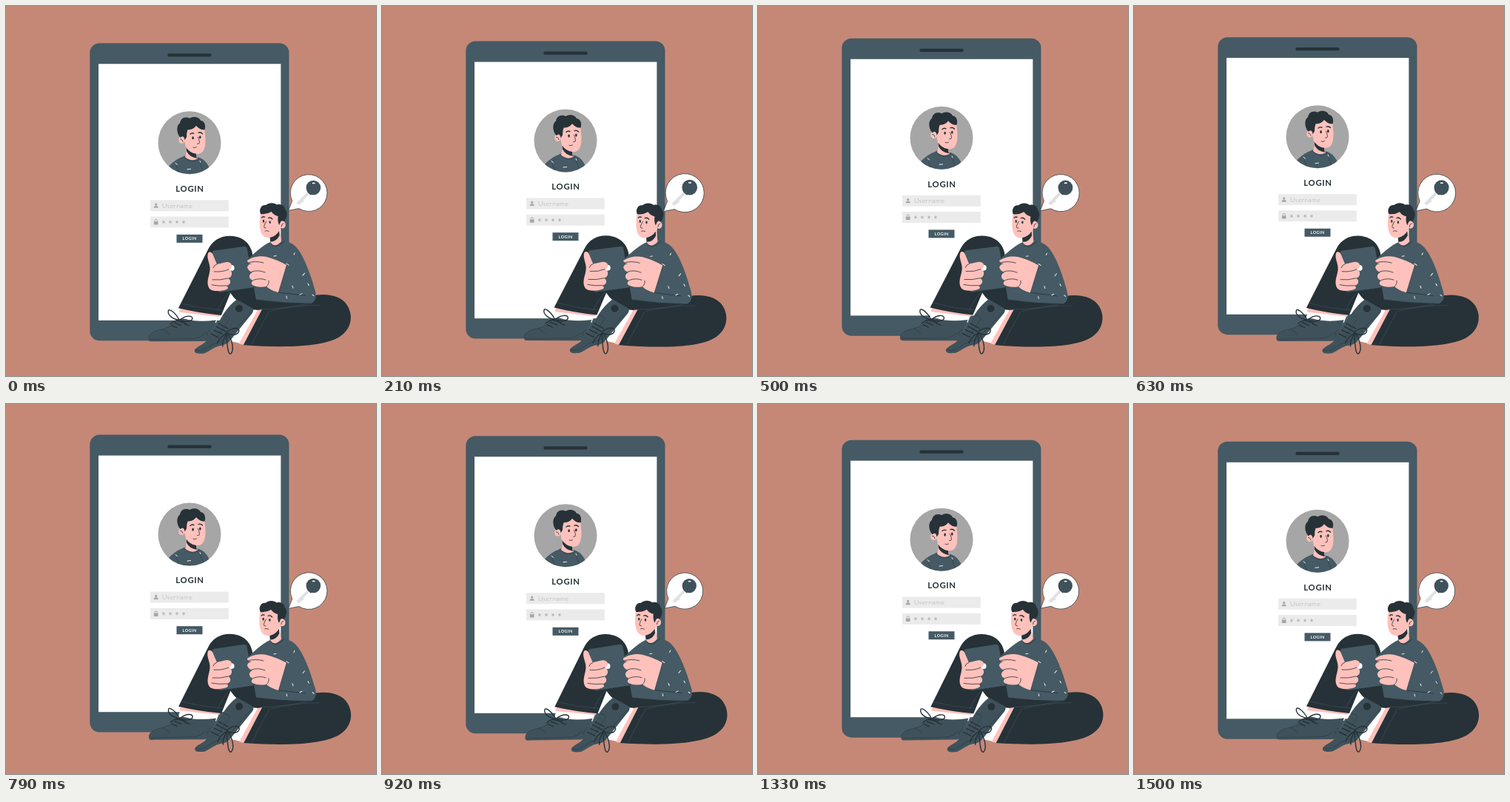
These frames come from a looping animation (500 by 500 pixels, 1540 ms). An HTML page:

```html
<!DOCTYPE html>
<html lang="en">
<head>
<meta charset="utf-8">
<title>Login</title>
<style>
html, body { margin: 0; width: 100%; height: 100%; overflow: hidden; background: #c58877; }
svg { display: block; width: 100%; height: 100%; }
text { font-family: Lato, "Open Sans", sans-serif; }
.dark { fill: #263238; }
.slate { fill: #455a64; }
.shade { fill: #3f525b; }
.skin { fill: #ffc1bb; }
.grey { fill: #a6a6a6; }
.pale { fill: #ebebeb; }
.white { fill: #fff; }
.line { fill: none; stroke: #263238; stroke-width: .8; stroke-linecap: round; stroke-linejoin: round; }
.bold { stroke-width: 1.4; }
.fine { stroke-width: .5; }
.edge { fill: none; stroke: #455a64; stroke-width: .5; }
.fleck { fill: none; stroke: #f2f2f2; stroke-width: 1; stroke-linecap: round; }
</style>
</head>
<body>
<svg viewBox="0 0 500 500">
  <defs><clipPath id="disc"><circle cx="248" cy="185.5" r="42.5"/></clipPath></defs>
  <rect width="500" height="500" fill="#c58877"/>

  <g id="panel">
    <rect class="slate" x="113.3" y="51" width="269.2" height="402" rx="13"/>
    <rect class="white" x="125" y="79" width="246.4" height="346.6"/>
    <rect class="dark" x="218.5" y="64.9" width="59" height="4.3" rx="1.6"/>

    <circle class="grey" cx="248" cy="185.5" r="42.5"/>
    <g clip-path="url(#disc)">
      <path class="slate" d="M213 226C221 214 231 207 242 203Q252 212 259 205C268 207 273 214 278 226L270 232H214Z"/>
      <path class="skin" d="M239 172L243 192Q244.5 199 242 205Q251 212 259 207Q257 204 257 200.5C266 202 270 194 269.5 180L268 164L247 160Z"/>
      <path class="dark" d="M243.5 192Q248 199 257 200.5Q257 204 258 206.5Q248 205 244 197Z"/>
      <ellipse class="skin" cx="237.5" cy="181.5" rx="4.2" ry="5"/>
      <path class="dark" d="M235.5 178.5C230 172 230 162 235 159C236 152 243 149.5 248 152.5C254 149 261 151 263 155.5C268 156 270.5 162 268.5 168C264 168.5 260 166 257 162.5C254 167 249 168 245.5 168Q244 172 244 178L241.5 182Q241 177 238 177Z"/>
      <ellipse class="dark" cx="252.6" cy="179" rx="1.3" ry="2.1"/>
      <ellipse class="dark" cx="262.3" cy="178" rx="1.3" ry="2.1"/>
      <path class="line" d="M259.5 178Q262.5 185 261 186.5L258.5 187M253 191.8Q255 192.8 257.5 191.4M235.5 180.5Q238 180 239 184"/>
      <path class="line bold" d="M249 173.8Q251.5 171.6 254 173M260 172Q263 170.6 265.5 173.4"/>
      <path class="line fine" d="M240 204Q251 216 261 207M262 212L268 228M230 217L235 228"/>
      <path class="fleck" d="M229 213L231.5 215M245 221.5L249.5 221M262 210L263 212M224 222L226 223"/>
    </g>

    <text x="229.3" y="251.8" font-size="11.3" font-weight="700" letter-spacing=".7" fill="#263238">LOGIN</text>
    <rect class="pale" x="195" y="263" width="105.8" height="15"/>
    <rect class="pale" x="195" y="285.2" width="105.8" height="15"/>
    <g class="grey">
      <circle cx="202.7" cy="268.8" r="1.6"/>
      <path d="M199.6 273.5Q199.8 270.7 202.7 270.7T205.8 273.5Z"/>
      <rect x="199.9" y="292" width="5.6" height="4.3" rx=".6"/>
      <path d="M201 292.3V291Q201 289.2 202.7 289.2T204.4 291V292.3" fill="none" stroke="#a6a6a6" stroke-width=".9"/>
    </g>
    <text x="211" y="273.6" font-size="8.6" font-weight="300" letter-spacing=".5" fill="#a6a6a6">Username</text>
    <path id="stars" fill="none" stroke="#a6a6a6" stroke-width=".7"/>
    <rect class="slate" x="230.5" y="309.6" width="35" height="11"/>
    <text x="238.6" y="317" font-size="5.4" font-weight="700" letter-spacing=".5" fill="#fff">LOGIN</text>
  </g>

  <g id="man">
    <!-- far foot -->
    <path class="white" d="M236 412L288 418L284 428L231 427Z"/>
    <path class="skin" d="M236 408L291 416L288 420L234 414Z"/>
    <path class="shade" d="M193 451C192 444 199 440 210 437.5Q224 434 231 425.5Q236 421 242 423Q258 428 284 424.5L274 450Q272 453 266 453L199 453.5Q193 454 193 451Z"/>
    <path class="line fine" d="M193 450Q196 451 203 450.7L256 449.5Q264 448 270 442M276 438Q271 441 272 446M193 448C195 442 201 439 210 437.5Q223 434 230 426.5M212 437.5Q217 440 221 444"/>
    <path class="line bold" d="M224 432L231 435M228 428.5L237 432M231 425.5L243 429M234 424C228 413 220 409 219.5 412C218 418 226 424 235 424.5C243 418 251 418 252 422C252 427 242 428 235 424.5M235 424.5Q227 425 222 430M236 424.5Q243 432 248 432"/>

    <!-- near leg -->
    <path class="dark" d="M302 386L338 378L412 392C432 387 453 391 461 404C470 418 467 436 452 446C434 459 385 463 319.5 458L344 411L333 412Q312 402 302 386Z"/>
    <path class="white" d="M331 410L341 411L317 456L300 452Z"/>
    <path class="skin" d="M340 411L346 410L321 458L315 456.5Z"/>
    <path class="edge" d="M356 412Q342 437 332 458M358 412Q390 404 424 404M344 410Q380 409 412 401"/>

    <!-- raised leg -->
    <path class="dark" d="M233 408.5L273.5 328C281 313 297 308 312 312C327 316 333 328 334 341L340 388L304 386L291 418Q260 415 233 408.5Z"/>
    <path class="edge" d="M237 402Q264 409 293 411M303 386Q293 395 286 412"/>

    <!-- near foot -->
    <path class="shade" d="M255 467C254 462 264 459 269 454.5Q283 436 294 416Q302 404 312 396.5L334 409Q335 411 333 415L304 451Q299 458 290 459C282 460 275 467 268 469.5Q256 471 255 467Z"/>
    <path class="line fine" d="M255.5 465Q264 468 271 463Q281 455 291 453Q300 449 304 443L333 412M294 418Q300 419 302 423L286 447"/>
    <circle class="dark" cx="315" cy="408.8" r="5"/>
    <path class="line bold" d="M281 438L292 443M284 433L297 440M287 429L300 436M277 443L287 448M298 441C307 433 315 435 315 439C314 445 305 446 299 442C306 451 309 465 304 470C299 472 299 452 298 442M299 442Q289 447 286 456M299 441Q292 453 293 460"/>

    <!-- torso -->
    <path class="slate" d="M357 319Q347 323 328 341L338 397Q374 402 410 402C420 401 420 390 417 382C410 357 399 329 387 321.5Q380 317 371 318Z"/>
    <path class="line" d="M379 350L368 387L404 391M357 319Q362 331 376 318M338 397Q374 402 411 402"/>
    <path class="fleck" d="M362 338L365 337.5M389 336L390 333.5M379 348L382 350M401 364L403.5 361M387 378L388 381M408 375L409.5 377.5M397 390L400 388.5M379 392L379.5 395M414 390L416 391.5"/>

    <!-- tablet and hands -->
    <path class="slate" d="M279 334Q278 331 282 330.6L321 325Q325 324.5 326 328L336 377Q337 380 333 381L291 387Q287 387.5 286 384Z"/>
    <path class="line" d="M326 328L336 377Q337 380 333 381L291 387"/>
    <circle class="white" cx="304.7" cy="354" r="3.9"/>
    <path class="skin" d="M273 334C275 331 279 333 280 337L285 349L298 346Q304 346 305 350Q306 354 301 356Q306 358 305 363Q304 367 300 368Q304 370 303 374Q302 377 298 378Q302 381 298 383C290 386 279 386 275 382C270 375 274 366 275 360C278 350 270 342 273 334Z"/>
    <path class="line" d="M285 349Q281 350 280 354M301 356Q292 360 281 359M300 368Q290 371 279 370M298 378Q287 379 278 377"/>
    <path class="skin" d="M326 344C332 339 344 337 352 339Q367 343 379 350L368 387Q357 384 352 379Q340 381 333 377Q330 374 334 371Q328 369 329 364Q330 361 333 360Q327 358 326 353Q327 349 332 348Q326 348 326 344Z"/>
    <path class="line" d="M327 347Q337 344 348 347M332 359Q341 356 350 360M334 370.5Q343 367 351 370M352 379Q356 376 355 371"/>

    <!-- head -->
    <path class="skin" d="M344 278C342 290 342 300 345 307Q348 314 357 313L357 319Q363 328 372 318L370 304L376 283L365 271Z"/>
    <path class="dark" d="M356.5 313Q365 311 369 304L369.5 310Q365 319 357 318.5Z"/>
    <ellipse class="skin" cx="373.5" cy="295.5" rx="4.2" ry="5"/>
    <path class="dark" d="M344 281C341 275 345 268 351 269C356 264.5 363 266 366 268.5C372 266.5 377 271 377 275C381 279 379.5 286 376 291Q373 289 371 291.5L369 296Q366.5 291 367.5 284Q362 283 358.5 278Q352 282 344 281Z"/>
    <ellipse class="dark" cx="347.9" cy="290.7" rx="1.2" ry="1.9"/>
    <ellipse class="dark" cx="356.6" cy="292" rx="1.2" ry="1.9"/>
    <path class="line" d="M351.5 291Q347.5 298 349 299.5L351 300M350 304Q352 302.8 355 304.3M375 293.5Q372 294 372 298"/>
    <path class="line bold" d="M345.5 286Q347 284 349.3 285.2M354.5 286.4Q357.5 285 359.8 288"/>
  </g>

  <g id="bubble">
    <path class="white" stroke="#263238" stroke-width=".7" stroke-linejoin="round" d="M387 263.3L382 276.3L396 273.5A24.5 24.5 0 1 0 387 263.3Z"/>
    <path d="M409 252.5L394 267.5M399 262.5L401.5 265M396 265.5L398 267.5" fill="none" stroke="#e0dfe2" stroke-width="3.6"/>
    <path class="line bold" d="M407.3 250.3L411.8 254.8"/>
    <circle class="shade" cx="415.3" cy="245.8" r="9.7"/>
    <ellipse class="white" cx="415.6" cy="239.8" rx="2" ry=".9"/>
  </g>
</svg>
<script>
const LOOP = 1540, STEPS = 37;
const get = id => document.getElementById(id);
const panel = get("panel"), man = get("man"), bubble = get("bubble");

get("stars").setAttribute("d", [213, 222, 231, 240].map(x =>
  `M${x} 290.5v4.4M${x - 1.9} 291.6l3.8 2.2M${x - 1.9} 293.8l3.8 -2.2`).join(""));

// Linear interpolation through [time, value] pairs.
function track(keys, u) {
  const i = Math.max(1, keys.findIndex(k => k[0] >= u));
  const [a, p] = keys[i - 1], [b, q] = keys[i];
  return p + (q - p) * (u - a) / (b - a);
}

const lift = [[0, -.2], [.5, -10.2], [1, -.2]];
const sway = [[0, 0], [.25, 1], [.75, -1], [1, 0]];
const beat = [[0, 1], [.14, 1.075], [.28, 1.01], [.42, 1.04], [.6, 1], [1, 1]];

function draw(ms) {
  // The motion advances at 24 steps per second.
  const step = Math.min(STEPS - 1, Math.floor((ms % LOOP + 5) * .024));
  const u = (step + 1) / STEPS;
  panel.setAttribute("transform", `translate(0 ${track(lift, u)})`);
  man.setAttribute("transform", `rotate(${track(sway, u)} 329 368)`);
  bubble.setAttribute("transform", `translate(408.5 252.3) scale(${track(beat, u)}) translate(-408.5 -252.5)`);
}

let start = null;
function tick(now) {
  if (start === null) start = now;
  draw(now - start);
  requestAnimationFrame(tick);
}
draw(0);
requestAnimationFrame(tick);
</script>
</body>
</html>
```
